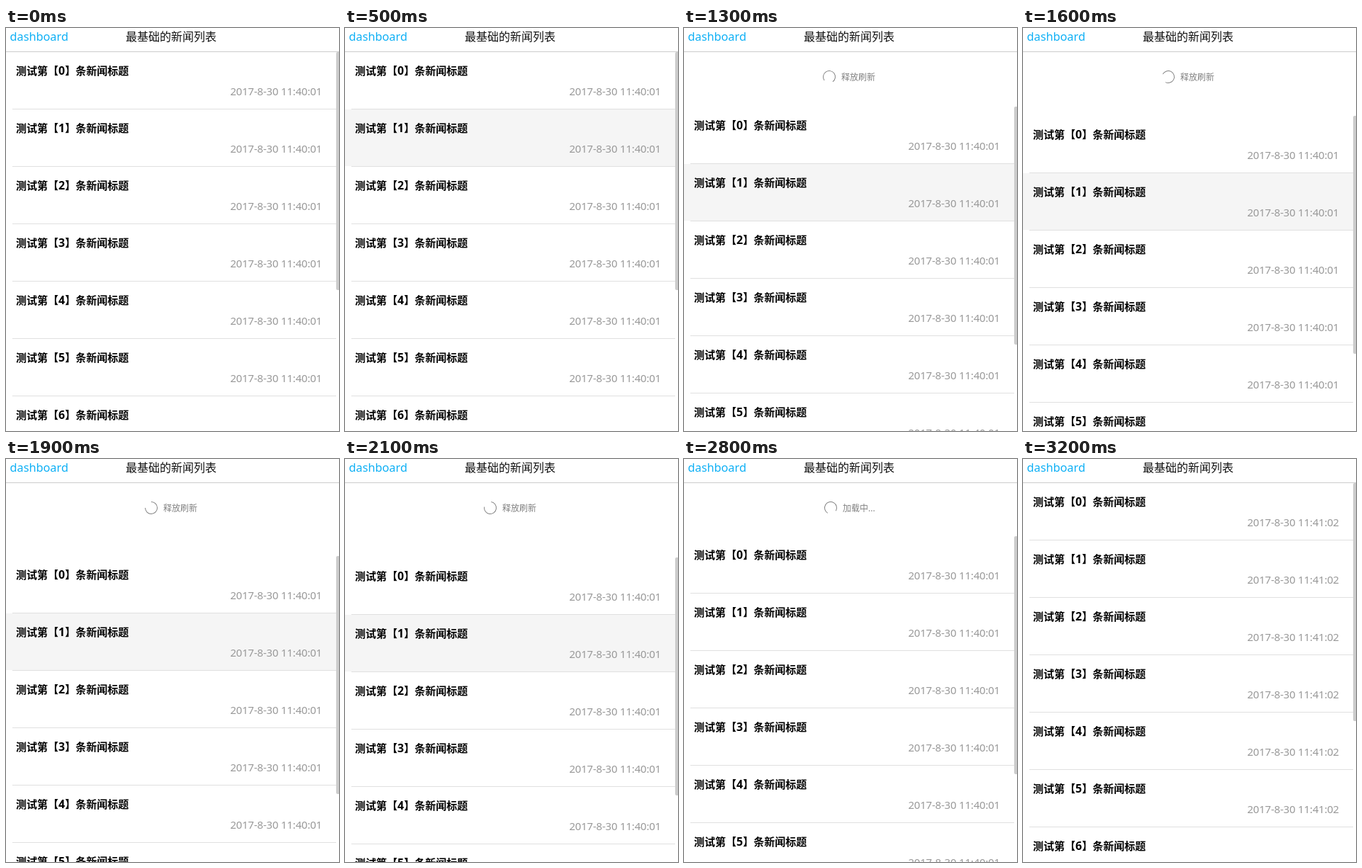
These frames come from a looping animation (470x569 px, 3500 ms). An HTML page:

```html
<!DOCTYPE html>
<html lang="zh-CN">
<head>
<meta charset="utf-8">
<title>最基础的新闻列表</title>
<style>
  html, body { margin: 0; width: 100%; height: 100%; overflow: hidden; background: #fff; }
  svg { display: block; width: 470px; height: 569px; }
  text { font-family: "Noto Sans", "Noto Sans CJK SC", "Noto Sans CJK", sans-serif; }
  .back { font-size: 16.3px; fill: #0eb0f5; }
  .head { font-size: 16px; fill: #111; }
  .title { font-size: 15px; font-weight: 700; fill: #000; }
  .num { font-size: 16px; }
  .date { font-size: 15px; letter-spacing: -.2px; fill: #999; text-anchor: end; }
  .tip { font-size: 12px; fill: #808080; }
  .line { fill: #e0e0e0; }
  .ring { fill: none; stroke: #808080; stroke-width: 1; }
</style>
</head>
<body>
<svg viewBox="0 0 470 569">
  <rect width="470" height="569" fill="#fff"/>
  <g id="tip">
    <path id="ring" class="ring" d="M-6.01 6.01A8.5 8.5 0 1 1 6.01 6.01"/>
    <text id="label" class="tip" x="26" y="74"></text>
  </g>
  <g id="list">
    <rect y="34" width="470" height="600" fill="#fff"/>
    <rect id="active" y="115" width="466" height="80" fill="#f5f5f5"/>
    <g id="rows"></g>
    <rect x="466" y="34" width="8" height="336" rx="2" fill="#ccc"/>
  </g>
  <text class="back" x="5.5" y="18">dashboard</text>
  <text class="head" x="169" y="18">最基础的新闻列表</text>
  <rect y="33" width="470" height="1" fill="#ccc"/>
</svg>
<script>
const LOOP = 3500, STEP = 100, ROW = 81, REST = 75;
const PRESS = 500, RELEASE = 2300, DONE = 2850, BOUNCE = 300;
// finger path: time, list offset
const PULL = [[600, 0], [900, 30], [1300, 77], [1900, 103], [RELEASE, 107]];

const $ = id => document.getElementById(id);
const rows = $('rows');
for (let i = 0; i < 7; i++) {
  const y = 34 + i * ROW;
  rows.innerHTML += `<text class="title" x="14" y="${y + 32}">测试第【<tspan class="num">${i}</tspan>】条新闻标题</text>
    <text class="date" x="446" y="${y + 61}"></text>
    <rect class="line" x="9" y="${y + 80}" width="457" height="1"/>`;
}
const dates = rows.querySelectorAll('.date');

// cubic-bezier(.25, .1, .25, 1)
function ease(x) {
  if (x <= 0) return 0;
  if (x >= 1) return 1;
  const bez = (a, b, s) => 3 * a * s * (1 - s) ** 2 + 3 * b * s * s * (1 - s) + s ** 3;
  let lo = 0, hi = 1;
  for (let i = 0; i < 24; i++) {
    const mid = (lo + hi) / 2;
    if (bez(.25, .25, mid) < x) lo = mid; else hi = mid;
  }
  return bez(.1, 1, lo);
}

function pulled(t) {
  if (t <= PULL[0][0]) return 0;
  const i = PULL.findIndex(p => t <= p[0]);
  const [t0, y0] = PULL[i - 1], [t1, y1] = PULL[i];
  return Math.round(y0 + (y1 - y0) * (t - t0) / (t1 - t0));
}

function offset(t) {
  if (t <= RELEASE) return pulled(t);
  if (t < DONE) return REST + (pulled(RELEASE) - REST) * (1 - ease((t - RELEASE) / BOUNCE));
  return REST * (1 - ease((t - DONE) / BOUNCE));
}

function draw(t) {
  const y = offset(t), loading = t > RELEASE;
  const angle = loading ? 45 + (t - RELEASE) * .6 : y / REST * 360;
  const date = t < DONE ? '2017-8-30 11:40:01' : '2017-8-30 11:41:02';
  $('list').setAttribute('transform', `translate(0 ${y})`);
  $('tip').setAttribute('transform', `translate(${loading ? 198 : 196} 0)`);
  $('ring').setAttribute('transform', `translate(9 69) rotate(${angle})`);
  $('label').textContent = loading ? '加载中...' : y < REST ? '下拉刷新' : '释放刷新';
  $('active').style.visibility = t >= PRESS && !loading ? 'visible' : 'hidden';
  dates.forEach(d => { d.textContent = date; });
}

let start, last;
function tick(now) {
  if (start === undefined) start = now;
  const t = Math.floor((now - start) % LOOP / STEP) * STEP;
  if (t !== last) draw(last = t);
  requestAnimationFrame(tick);
}
draw(0);
requestAnimationFrame(tick);
</script>
</body>
</html>
```
